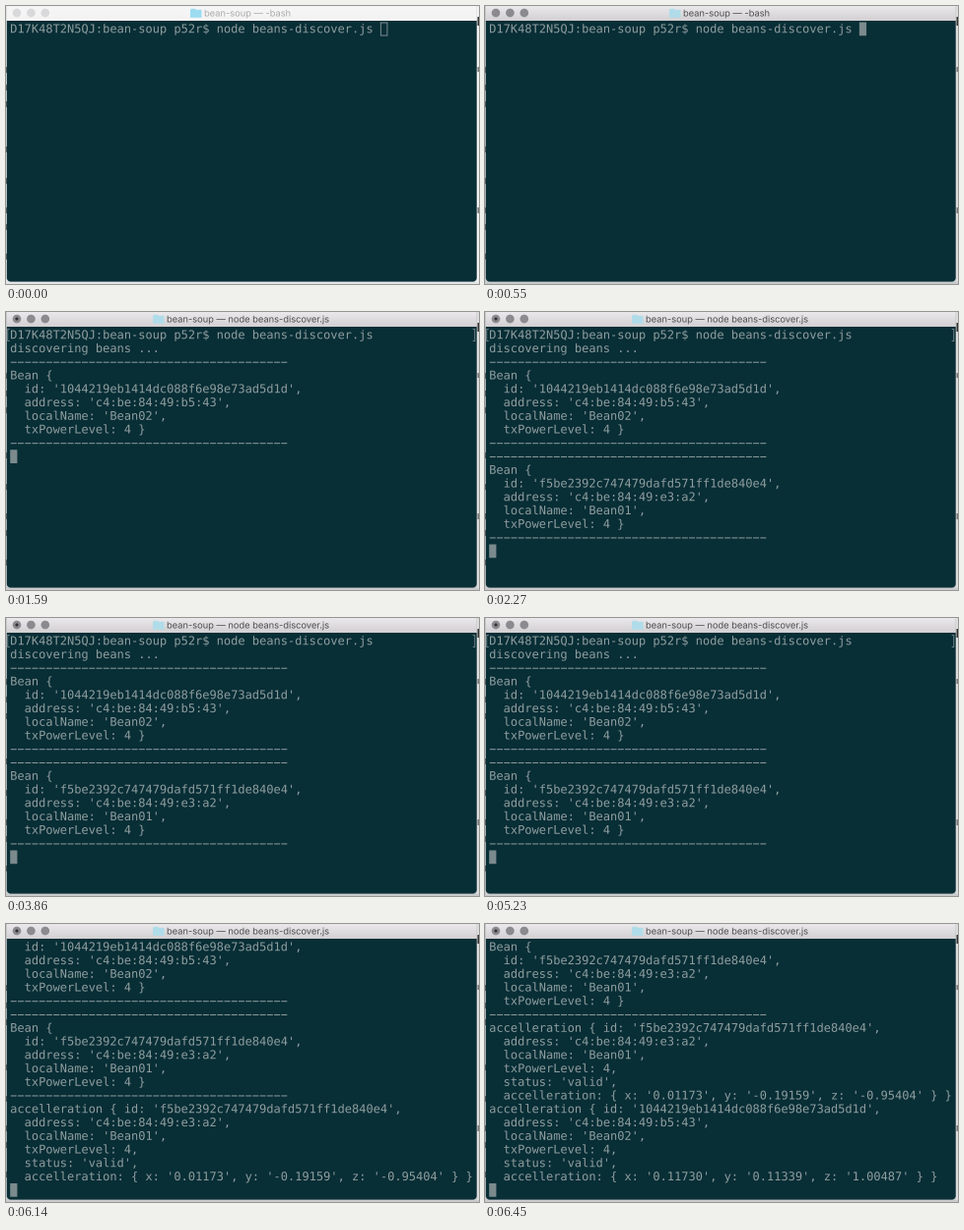
Animation, 480 px wide and 283 px high, one loop 6490 ms. Source, as an HTML page with a canvas:

```html
<!DOCTYPE html>
<html lang="en">
<head>
<meta charset="utf-8">
<title>Terminal</title>
<style>
html, body { margin: 0; width: 100%; height: 100%; overflow: hidden; background: #eee; }
canvas { display: block; width: 480px; height: 283px; }
</style>
</head>
<body>
<canvas id="stage" width="480" height="283"></canvas>
<script>
const W = 480, H = 283, LOOP = 6490;
const view = document.getElementById('stage').getContext('2d');
view.imageSmoothingQuality = 'high';

// The scene is drawn large and scaled down, so text keeps fractional positions.
const ZOOM = 4;
const sheet = document.createElement('canvas');
sheet.width = W * ZOOM;
sheet.height = H * ZOOM;
const ctx = sheet.getContext('2d');
ctx.scale(ZOOM, ZOOM);
ctx.textRendering = 'geometricPrecision';

const ROWS = 19, ROW_H = 13.75, TOP = 16.5, LEFT = 4.2, CHAR_W = 7.224;
const MONO = '12px "DejaVu Sans Mono", monospace';
const SANS = '9.3px Inter, sans-serif';
const INK = '#8f9e9f', CURSOR = '#7b8a8d', BRACKET = '#6b7f83';

const RULE = '-'.repeat(39);
const PROMPT = 'D17K48T2N5QJ:bean-soup p52r$ node beans-discover.js ';
const beans = [
  { id: 'f5be2392c747479dafd571ff1de840e4', mac: 'c4:be:84:49:e3:a2', name: 'Bean01' },
  { id: '1044219eb1414dc088f6e98e73ad5d1d', mac: 'c4:be:84:49:b5:43', name: 'Bean02' }
];
const fields = b => [`  address: '${b.mac}',`, `  localName: '${b.name}',`];
const found = b => [RULE, 'Bean {', `  id: '${b.id}',`, ...fields(b), '  txPowerLevel: 4 }', RULE];
const reading = (b, x, y, z) => [
  `accelleration { id: '${b.id}',`, ...fields(b), '  txPowerLevel: 4,', "  status: 'valid',",
  `  accelleration: { x: '${x}', y: '${y}', z: '${z}' } }`
];

const FOCUS = 140, ENTER = 590;
const output = [
  [730, ['discovering beans ...']],
  [1360, found(beans[1])],
  [2270, found(beans[0])],
  [6090, reading(beans[0], '0.01173', '-0.19159', '-0.95404')],
  [6320, reading(beans[1], '0.11730', '0.11339', '1.00487')]
];

// start time, icon x, text
const titles = [
  [0, 187, '-bash'],
  [ENTER, 149, 'node beans-discover.js'],
  [730, 111, 'system_profiler • node beans-discover.js'],
  [1320, 149, 'node beans-discover.js']
];

function box(x, y, w, h, color) {
  ctx.fillStyle = color;
  ctx.fillRect(x, y, w, h);
}

function disc(x, y, r, color) {
  ctx.fillStyle = color;
  ctx.beginPath();
  ctx.arc(x, y, r, 0, Math.PI * 2);
  ctx.fill();
}

function print(text, x, y, font, color) {
  ctx.font = font;
  ctx.fillStyle = color;
  ctx.fillText(text, x, y);
}

function drawDesktop(active) {
  box(0, 0, W, H, active ? '#c9cacb' : '#e4e5e6');
  box(478, 0, 2, 281, active ? '#dcdcdc' : '#f2f2f2');
  for (const y of [62, 80, 97, 143, 175, 205, 222, 252]) box(0, y, 0.8, 6, '#5c6264');
  box(478.5, 11, 1.5, 9, '#333');
  box(478.5, 62, 1.5, 5, '#777');
  box(478.5, 205, 1.5, 6, '#777');
}

function drawBar(t, active) {
  const g = ctx.createLinearGradient(0, 0, 0, 15);
  g.addColorStop(0, active ? '#ebe9eb' : '#f7f6f7');
  g.addColorStop(1, active ? '#d2d0d2' : '#f4f3f4');
  box(0, 0, W, 15, g);
  for (let i = 0; i < 3; i++) disc(11 + i * 14.4, 7, 4.3, active ? '#8b8a8e' : '#d9d8da');
  if (t >= ENTER) disc(11, 7, 1.6, '#333236');

  const [, x, name] = titles.filter(e => e[0] <= t).pop();
  const blue = active ? '#b0dcea' : '#9bdcf0';
  box(x + 0.5, 2.8, 5, 2, blue);
  box(x, 3.8, 11.5, 8, blue);
  print('bean-soup — ' + name, x + 14, 10.6, SANS, active ? '#4c4b4d' : '#aaa9ab');
}

function drawBracket(x, dir) {
  ctx.strokeStyle = BRACKET;
  ctx.lineWidth = 1;
  ctx.beginPath();
  ctx.moveTo(x + 2 * dir, 17.5);
  ctx.lineTo(x, 17.5);
  ctx.lineTo(x, 29.5);
  ctx.lineTo(x + 2 * dir, 29.5);
  ctx.stroke();
}

function drawLine(text, y) {
  if (text === RULE) {
    for (let i = 0; i < text.length; i++) box(LEFT + i * CHAR_W + 0.6, y + 6.7, 6, 1, INK);
  } else {
    print(text, LEFT, y + 10.8, MONO, INK);
  }
}

function drawText(t, active) {
  let lines = [PROMPT];
  for (const [at, block] of output) if (t >= at) lines = lines.concat(block);
  if (t >= ENTER) lines.push('');
  const skip = Math.max(0, lines.length - ROWS);
  const shown = lines.slice(skip);
  shown.forEach((s, i) => drawLine(s, TOP + i * ROW_H));
  if (t >= ENTER && !skip) {
    drawBracket(1.7, 1);
    drawBracket(475.7, -1);
  }
  const last = shown.length - 1;
  const x = LEFT + shown[last].length * CHAR_W, y = TOP + last * ROW_H;
  if (active) {
    box(x, y, CHAR_W, ROW_H, CURSOR);
  } else {
    ctx.strokeStyle = CURSOR;
    ctx.lineWidth = 1;
    ctx.strokeRect(x + 0.5, y + 0.5, CHAR_W - 0.7, ROW_H - 0.7);
  }
}

function draw(t) {
  const active = t >= FOCUS;
  drawDesktop(active);
  ctx.save();
  ctx.beginPath();
  ctx.roundRect(0.8, -8, 476.9, 288.6, 4);
  ctx.clip();
  box(0, 0, W, H, '#082e36');
  drawBar(t, active);
  drawText(t, active);
  ctx.restore();
  view.drawImage(sheet, 0, 0, W, H);
}

const changes = [0, FOCUS, ENTER, ...output.map(e => e[0]), ...titles.map(e => e[0])];
const start = performance.now();
let drawn = -1;
function tick() {
  const t = (performance.now() - start) % LOOP;
  const state = Math.max(...changes.filter(c => c <= t));
  if (state !== drawn) draw(drawn = state);
  requestAnimationFrame(tick);
}
tick();
</script>
</body>
</html>
```
